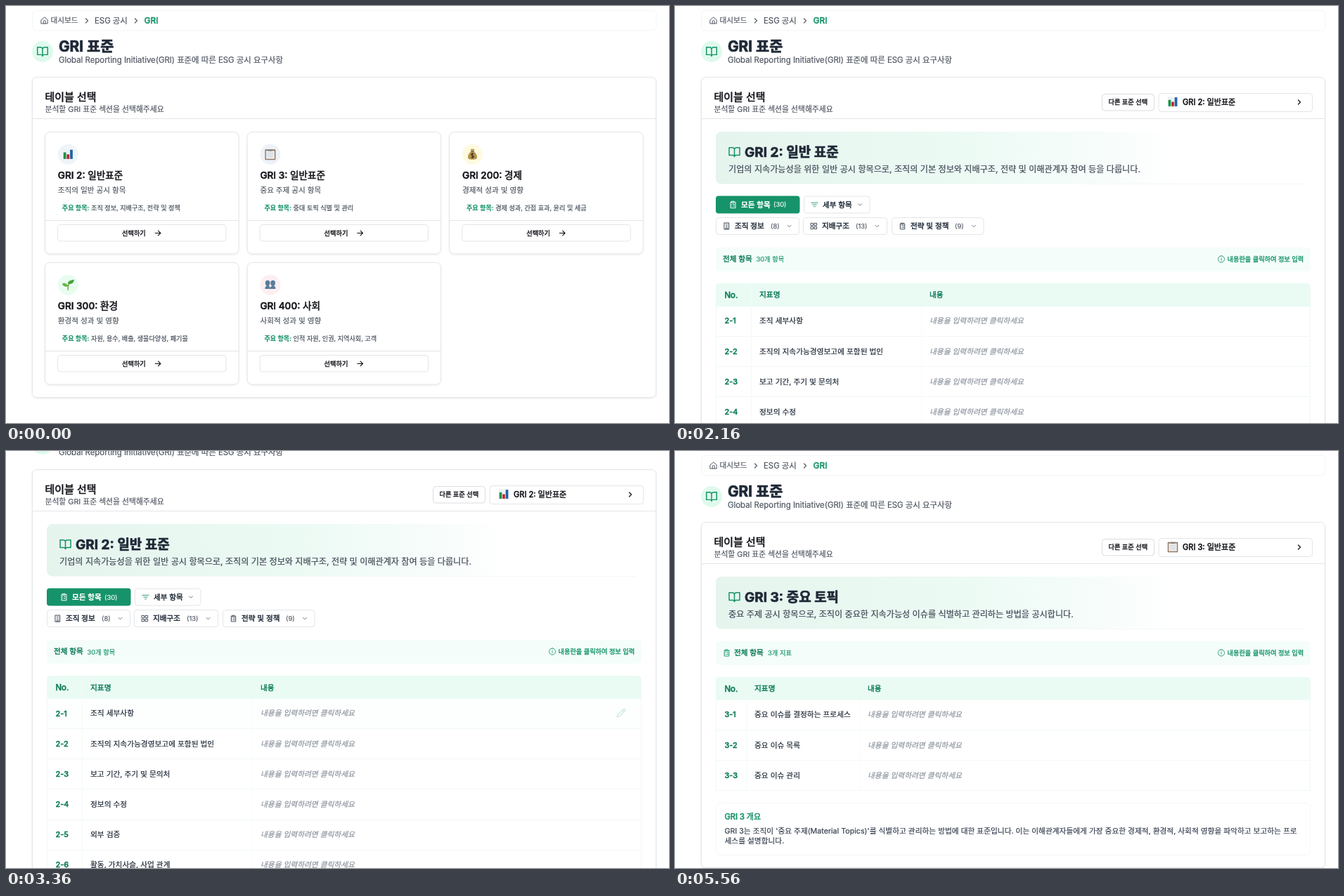
An HTML page for the animation above (5.72 s loop, 943 px wide and 594 px high).

```html
<!DOCTYPE html>
<html lang="ko">
<head>
<meta charset="utf-8">
<title>GRI 표준</title>
<style>
html, body { margin: 0; width: 100%; height: 100%; overflow: hidden; background: #fff; }
svg { display: block; width: 943px; height: 594px; }
/* A thin outline gives Korean glyphs the in-between weights */
text { font-family: Inter, "Noto Sans CJK KR", "Noto Sans CJK", sans-serif; white-space: pre; fill: currentColor; stroke: currentColor; stroke-width: .02em; }
text[font-weight="500"] { stroke-width: .038em; }
text[font-weight="700"] { stroke-width: .035em; }
</style>
</head>
<body>
<svg id="stage" viewBox="0 0 943 594" xmlns="http://www.w3.org/2000/svg"></svg>
<script>
const LOOP = 5720, TICK = 40;
const INK = '#111318', DARK = '#1f2937', GRAY = '#525964', GREEN = '#16936a', DEEP = '#0b7a57', LINE = '#e3e5e9';

const ICONS = {
  home: 'M3 10.5 12 3l9 7.5V21H3zM9 21v-6a3 3 0 0 1 6 0v6',
  right: 'M9 6l6 6-6 6',
  down: 'M6 9l6 6 6-6',
  arrow: 'M4 12h16M13 5l7 7-7 7',
  book: 'M2 3.5h6a4 4 0 0 1 4 4V21a3 3 0 0 0-3-3H2zM22 3.5h-6a4 4 0 0 0-4 4V21a3 3 0 0 1 3-3h7z',
  clip: 'M9 2.5h6v4H9zM9 4.5H5v17h14v-17h-4M12 11h4M12 16h4M8 11h.1M8 16h.1',
  filter: 'M2 6h20M6 12h12M10 18h4',
  building: 'M5 2h14v20H5zM9 22v-4h6v4M9 6h.1M15 6h.1M9 10h.1M15 10h.1M9 14h.1M15 14h.1M12 6h.1M12 10h.1M12 14h.1',
  grid: 'M3 3h7v7H3zM14 3h7v7h-7zM14 14h7v7h-7zM3 14h7v7H3z',
  info: 'M12 2a10 10 0 1 0 .01 0M12 16v-5M12 8h.01',
  pencil: 'M17 3a2.8 2.8 0 1 1 4 4L7.5 20.5 2 22l1.5-5.5zM15 5l4 4',
  check: 'M4 12l5 5L20 6'
};

// Small pictograms in a 16 by 16 box
const PICTOS = {
  chart: '<path d="M0 0h16v16H0z" fill="#eef1f4"/><path d="M1 5h4v10H1z" fill="#169447"/><path d="M6 8h4v7H6z" fill="#c4232d"/><path d="M11 1h4v14h-4z" fill="#1e62a8"/>',
  board: '<rect x="0" y=".5" width="16" height="16" rx="1" fill="#94765c"/><path d="M1.5 2.500h13v12.500h-13z" fill="#e6e9ed"/><path d="M4 6h8M4 8.500h8M4 11h8" stroke="#cdd2d8" stroke-width=".8"/><path d="M5 .5h6v2.500H5z" fill="#7d848d"/>',
  money: '<path d="M5 0h6l-1 4c3 1.500 5 5 5 8 0 3-2 4-7 4s-7-1-7-4c0-3 2-6.500 5-8z" fill="#b9954f"/><path d="M5.500 4h5" stroke="#7b5a22" stroke-width="1.300"/><path d="M10 7.500C8.500 6.300 6 6.800 6 8.400c0 2 4 1.300 4 3.200 0 1.700-2.600 2-4.200.7M8 6v8" fill="none" stroke="#3f3216" stroke-width="1.200"/>',
  sprout: '<path d="M8 16C7.500 12 8 8 11 4M8 10C7 8 5 7 3 7" fill="none" stroke="#6aa83a" stroke-width="1.500"/><path d="M7.500 6C8 1 13 1 17 0c0 5-4 8-9.500 6z" fill="#48a23c"/><path d="M-1 6c4-1.500 7-.500 8.500 4C4 11.500 0 10 -1 6z" fill="#66b548"/>',
  people: [0, 8].map(x => `<path d="M${x + 4} 1c5 0 4 7 1.500 8.500 2 .8 2.500 2 2.500 4.500h-8c0-2.500.5-3.700 2.500-4.500C${x} 8 ${x - 1} 1 ${x + 4} 1z" fill="#587c9a"/>`).join('')
};

const STANDARDS = [
  ['GRI 2: 일반표준', '조직의 일반 공시 항목', '조직 정보, 지배구조, 전략 및 정책', 'chart', '#eff4f8'],
  ['GRI 3: 일반표준', '중요 주제 공시 항목', '중대 토픽 식별 및 관리', 'board', '#eef2f8'],
  ['GRI 200: 경제', '경제적 성과 및 영향', '경제 성과, 간접 효과, 윤리 및 세금', 'money', '#fefae0'],
  ['GRI 300: 환경', '환경적 성과 및 영향', '자원, 용수, 배출, 생물다양성, 폐기물', 'sprout', '#e8fcf0'],
  ['GRI 400: 사회', '사회적 성과 및 영향', '인적 자원, 인권, 지역사회, 고객', 'people', '#fdeef1']
];

// cy is the vertical middle of the line
const text = (x, cy, s, size, color = INK, weight = 400, extra = '') =>
  `<text x="${x}" y="${(cy + size * .37).toFixed(2)}" font-size="${size}" color="${color}" font-weight="${weight}" ${extra}>${s}</text>`;
const box = (x, y, w, h, r, fill = '#fff', stroke = 'none', extra = '') =>
  `<rect x="${x}" y="${y}" width="${w}" height="${h}" rx="${r}" fill="${fill}" stroke="${stroke}" ${extra}/>`;
const line = (x1, y1, x2, y2, c = LINE) => `<path d="M${x1} ${y1}L${x2} ${y2}" stroke="${c}"/>`;
const icon = (name, cx, cy, size, c, w = 2) =>
  `<g transform="translate(${cx - size / 2} ${cy - size / 2}) scale(${size / 24})"><path d="${ICONS[name]}" fill="none" stroke="${c}" stroke-width="${w}" stroke-linecap="round" stroke-linejoin="round"/></g>`;
const picto = (name, cx, cy, size = 15, id = '') =>
  `<g ${id && `id="${id}"`} transform="translate(${cx - size / 2} ${cy - size / 2}) scale(${size / 16})">${PICTOS[name]}</g>`;
const group = (id, body, extra = '') => `<g id="${id}" ${extra}>${body}</g>`;

function card([title, desc, items, pic, tint], i) {
  const x = 55.5 + i % 3 * 287.6, y = 179.5 + Math.floor(i / 3) * 186;
  return (i ? '' : box(x, y + 1, 275.5, 173.5, 7, '#fff', 'none', 'id="lift" filter="url(#lifted)"')) +
    box(x, y, 275.5, 173.5, 7, '#fff', LINE, `filter="url(#soft)" ${i ? '' : 'id="first"'}`) +
    `<circle cx="${x + 32.8}" cy="${y + 31.8}" r="14.5" fill="${tint}"/>` +
    picto(pic, x + 32.8, y + 31.8) +
    text(x + 18.3, y + 61, title, 13.6, INK, 500) +
    text(x + 18.3, y + 83, desc, 10.6, GRAY) +
    text(x + 24.3, y + 108, `<tspan color="${GREEN}" font-weight="600">주요 항목:</tspan> ${items}`, 9.1, '#414a57') +
    line(x, y + 126, x + 275.5, y + 126) +
    box(x + 18, y + 132, 239.5, 23.5, 4, '#fff', LINE) +
    text(x + 109.5, y + 144, '선택하기', 9.2, INK, 500) +
    icon('arrow', x + 160.5, y + 144, 11.5, INK, 2.3);
}

const banner = (title, desc) =>
  box(58, 179, 845, 74.5, 8, 'url(#fade)') + line(66, 253.5, 897, 253.5, '#f4f8f7') +
  icon('book', 84.5, 208, 18, GREEN) +
  text(99, 207.5, title, 19, DARK, 700) + text(76, 232.5, desc, 12.13, '#434c59');

const infoBar = (y, x, label, count, countX) =>
  box(58, y, 845.5, 34, 5, '#f4fdfa') +
  text(x, y + 16.5, label, 10.6, DEEP, 500) + text(countX, y + 17, count, 9.3, GREEN) +
  icon('info', 777, y + 16.5, 11, GREEN) +
  text(785.5, y + 16.5, '내용란을 클릭하여 정보 입력', 9.18, GREEN, 500);

function table(y, c1, c2, prefix, rows) {
  const end = y + 33 + rows.length * 43.15;
  let s = `<path d="M58 ${y + 33}v-28q0-5 5-5h835.500q5 0 5 5v28z" fill="#eafbf4"/>` +
    text(70.5, y + 16.5, 'No.', 11.4, DEEP, 500) +
    text(c1 + 12, y + 16.5, '지표명', 10.7, DEEP, 500) + text(c2 + 12, y + 16.5, '내용', 10.7, DEEP, 500);
  if (prefix === 2) s += box(58, y + 33, 845, 43, 0, '#f4fcfa', 'none', 'id="rowTint"') +
    group('pencil', icon('pencil', 875, y + 53, 14, GREEN));
  rows.forEach((name, i) => {
    const cy = y + 53.4 + i * 43.15, b = Math.round(y + 33 + (i + 1) * 43.15) - .5;
    s += line(58, b, 903, b, '#f0f8f6') +
      text(70.5, cy, `${prefix}-${i + 1}`, 10.9, DEEP, 500) + text(c1 + 12, cy, name, 10.7, DARK) +
      text(c2 + 12, cy, '내용을 입력하려면 클릭하세요', 10.7, '#8f96a1', 400, 'font-style="italic"');
  });
  return s + line(58.5, y + 5, 58.5, end, '#edf9f5') + line(903.5, y + 5, 903.5, end, '#f1f8f6') +
    line(c1 + .5, y, c1 + .5, end, '#f3faf8') + line(c2 + .5, y + 33, c2 + .5, end, '#f7fbfa');
}

const filter = (x, y, w, pic, label, count, countX) =>
  box(x + .5, y + .5, w - 1, 24, 4, '#fff', LINE) +
  icon(pic, x + 15.5, y + 12.5, 11, pic === 'filter' ? GREEN : '#374151') +
  text(x + 27, y + 12.3, label, 10.6, DARK, 500) +
  (count ? text(countX, y + 12.5, count, 9.4, GRAY) : '') + icon('down', x + w - 14.5, y + 12.5, 10, GRAY);

const menuItem = ([title, desc, , pic], i) => {
  const y = 175 + i * 46;
  return picto(pic, 706, y + 6, 14) + text(723, y, title, 10.8, INK, 500) + text(723, y + 13.3, desc, 9, GRAY);
};

const stage = document.getElementById('stage');
stage.innerHTML = `
<defs>
  <linearGradient id="fade" gradientUnits="userSpaceOnUse" x1="58" x2="710" y1="0" y2="0">
    <stop offset="0" stop-color="#e6f4ee"/><stop offset=".5" stop-color="#ebfaf3"/>
    <stop offset=".8" stop-color="#f5fcfa"/><stop offset="1" stop-color="#fff"/>
  </linearGradient>
  <filter id="soft" x="-5%" y="-5%" width="110%" height="115%"><feDropShadow dx="0" dy="1" stdDeviation="1" flood-opacity=".09"/></filter>
  <filter id="lifted" x="-5%" y="-5%" width="110%" height="115%"><feDropShadow dx="0" dy="2" stdDeviation="2" flood-opacity=".24"/></filter>
  <filter id="deep" x="-10%" y="-10%" width="120%" height="125%"><feDropShadow dx="0" dy="4" stdDeviation="3" flood-opacity=".16"/></filter>
  <clipPath id="menuClip"><rect x="683" y="153" width="228" height="217.5" rx="5"/></clipPath>
</defs>` +
group('page',
  box(37.5, 6.5, 887.5, 28.5, 6, '#fff', '#f4f5f6') +
  icon('home', 54.7, 20.5, 12, GRAY) + text(63.5, 20.5, '대시보드', 10.6, GRAY) + icon('right', 115, 21, 12, GRAY, 2.4) +
  text(126, 20.5, 'ESG 공시', 11.4, GRAY) + icon('right', 185, 21, 12, GRAY, 2.4) + text(196.5, 20.5, 'GRI', 12, GREEN, 500) +
  `<circle cx="52" cy="65" r="15" fill="#dffaec"/>` + icon('book', 52, 65, 17.5, GREEN) +
  text(75, 57, 'GRI 표준', 20.8, DARK, 700) +
  text(75, 76.3, 'Global Reporting Initiative(GRI) 표준에 따른 ESG 공시 요구사항', 11.4, GRAY) +
  box(37.5, 101.5, 887, 456, 6, '#fff', LINE, 'id="panel" filter="url(#soft)"') +
  line(37.5, 160.5, 924.5, 160.5) +
  text(55.5, 129.3, '테이블 선택', 15, INK, 500) + text(55.5, 147, '분석할 GRI 표준 섹션을 선택해주세요', 10.8, GRAY) +
  group('cards', STANDARDS.map(card).join('')) +
  group('tools',
    box(607.5, 125.5, 74, 23.5, 4, '#fff', '#d9dce1') + text(616.5, 137, '다른 표준 선택', 9.2, INK, 500) +
    box(688, 124.5, 218.5, 26, 4, '#fff', LINE) +
    picto('chart', 708, 136.5, 14.5, 'chosen2') + picto('board', 708, 136.5, 14.5, 'chosen3') +
    text(722, 137, '', 11.07, INK, 500, 'id="chosen"') +
    group('chevron', icon('right', 888, 137, 12, INK, 2.6))) +
  group('load',
    `<circle cx="481" cy="260" r="22" fill="none" stroke="#f0f1f3" stroke-width="2.5"/>
     <path id="arc" d="M465.44 244.44A22 22 0 0 1 496.56 244.44" fill="none" stroke="${GREEN}" stroke-width="2.5"/>` +
    text(481, 304, '데이터를 불러오는 중입니다...', 12.06, '#434c59', 400, 'text-anchor="middle"')) +
  group('general',
    banner('GRI 2: 일반 표준', '기업의 지속가능성을 위한 일반 공시 항목으로, 조직의 기본 정보와 지배구조, 전략 및 이해관계자 참여 등을 다룹니다.') +
    box(58, 270.5, 119.5, 25, 4, GREEN) + icon('clip', 82.5, 283, 12, '#fff') +
    text(94, 282.8, '모든 항목', 10.6, '#fff', 600) + text(140, 283, '(30)', 9.4, '#fff') +
    filter(183, 270.5, 94.5, 'filter', '세부 항목') +
    filter(58, 301, 119, 'building', '조직 정보', '(8)', 136) +
    filter(182, 301, 120, 'grid', '지배구조', '(13)', 257) +
    filter(308, 301, 131.5, 'clip', '전략 및 정책', '(9)', 398) +
    infoBar(344, 68, '전체 항목', '30개 항목', 115.5) +
    table(395, 108, 350, 2, ['조직 세부사항', '조직의 지속가능경영보고에 포함된 법인', '보고 기간, 주기 및 문의처', '정보의 수정', '외부 검증', '활동, 가치사슬, 사업 관계', '임직원'])) +
  group('topics',
    banner('GRI 3: 중요 토픽', '중요 주제 공시 항목으로, 조직이 중요한 지속가능성 이슈를 식별하고 관리하는 방법을 공시합니다.') +
    infoBar(271, 84, '전체 항목', '3개 지표', 132) + icon('clip', 73.5, 287.5, 11.5, GREEN) +
    table(322, 101, 262, 3, ['중요 이슈를 결정하는 프로세스', '중요 이슈 목록', '중요 이슈 관리']) +
    box(58.5, 501.5, 845, 74, 6, '#fff', '#f4f8f7') +
    text(70.5, 520.5, 'GRI 3 개요', 11.1, GREEN, 500) +
    text(70.5, 541, "GRI 3는 조직이 '중요 주제(Material Topics)'를 식별하고 관리하는 방법에 대한 표준입니다. 이는 이해관계자들에게 가장 중요한 경제적, 환경적, 사회적 영향을 파악하고 보고하는 프로", 10.7, '#374151') +
    text(70.5, 555.3, '세스를 설명합니다.', 10.7, '#374151')) +
  group('menu',
    box(683, 153, 228, 217.5, 5, '#fff', '#e8eaed', 'filter="url(#deep)"') +
    group('items', box(686.5, 160, 210.5, 42, 3, '#e8f8f3', 'none', 'id="mark"') +
      STANDARDS.map(menuItem).join('') + group('tick', icon('check', 883, 181, 11, GREEN)), 'clip-path="url(#menuClip)"') +
    box(903, 155.5, 6, 191.5, 3, '#bfbfc1')));

const el = {};
stage.querySelectorAll('[id]').forEach(n => el[n.id] = n);

const ramp = (t, a, b) => Math.min(1, Math.max(0, (t - a) / (b - a)));
const easeOut = (p, k = 2) => 1 - Math.pow(1 - p, k);
const alpha = (name, v) => {
  el[name].setAttribute('opacity', v);
  el[name].setAttribute('display', v > 0 ? 'inline' : 'none');
};

function scrollAt(t) {
  if (t < 2560 || t >= 4760) return 0;
  if (t < 3280) return 133 * easeOut(ramp(t, 2520, 2800), 2.2);
  return 133 - 67 * easeOut(ramp(t, 3240, 3440), 2.2);
}

function draw(t) {
  const picking = t < 1280, second = t >= 4760;
  const general = t >= 1840 && !second, topics = t >= 5320;
  const loading = !picking && !general && !topics;

  el.page.setAttribute('transform', `translate(0 ${-scrollAt(t).toFixed(2)})`);
  el.panel.setAttribute('height', picking ? 456 : loading ? 288 : general ? 900 : 492);

  alpha('cards', +picking);
  const hover = ramp(t, 0, 120);
  alpha('lift', hover);
  el.first.setAttribute('stroke', hover > .5 ? '#d6d9de' : LINE);

  alpha('tools', +!picking);
  alpha('chosen2', +!second);
  alpha('chosen3', +second);
  el.chosen.textContent = STANDARDS[+second][0];
  const turn = 90 * (second ? 1 - ramp(t, 4760, 4960) : ramp(t, 3960, 4160));
  el.chevron.setAttribute('transform', `rotate(${turn} 888 137)`);

  alpha('load', +loading);
  const spin = (t - (second ? 4720 : 1240)) * .36;
  el.arc.setAttribute('transform', `rotate(${spin} 481 260)`);

  alpha('general', general ? easeOut(ramp(t, 1800, 2160)) : 0);
  alpha('topics', topics ? easeOut(ramp(t, 5280, 5560)) : 0);
  const over = ramp(t, 2640, 2800) * (1 - ramp(t, 3260, 3390));
  alpha('rowTint', over);
  alpha('pencil', over);

  const shown = second ? 1 - ramp(t, 4715, 4840) : ramp(t, 3960, 4120);
  alpha('menu', shown);
  const zoom = second ? 1 : .95 + .05 * shown;
  el.menu.setAttribute('transform', `translate(797 153) scale(${zoom}) translate(-797 -153)`);
  el.mark.setAttribute('y', t < 4240 ? 160 : 206);
  el.tick.setAttribute('transform', `translate(0 ${second ? 46 : 0})`);
}

const start = performance.now();
function frame() {
  const t = (performance.now() - start) % LOOP;
  draw(Math.floor(t / TICK) * TICK);
  requestAnimationFrame(frame);
}
frame();
</script>
</body>
</html>
```
